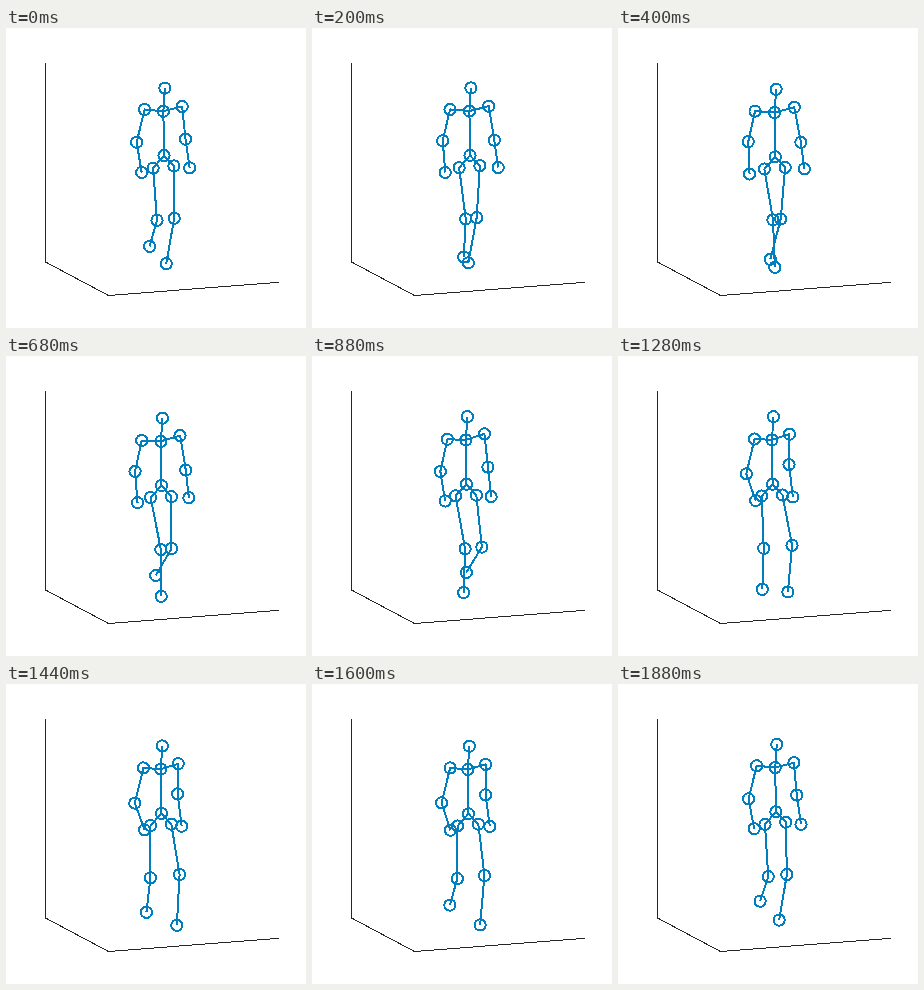
An HTML page for the animation above (1.92 s loop, 300x300 px).

```html
<!DOCTYPE html>
<html lang="en">
<head>
<meta charset="utf-8">
<title>Walking stick figure</title>
<style>
html, body { margin: 0; width: 100%; height: 100%; overflow: hidden; background: #fff; }
svg { display: block; }
</style>
</head>
<body>
<svg width="300" height="300" fill="none" shape-rendering="crispEdges">
  <path stroke="#262626" d="M39.5 35V234L102.5 267.5L273 254.3"/>
  <path id="walker" stroke="#007ebd" stroke-width="2" stroke-linejoin="round"/>
</svg>
<script>
const LOOP = 1920, STEP = 40, RADIUS = 5.6;
const { sin, cos, PI } = Math;
const walker = document.getElementById('walker');

// A step cycle: a main wave and its overtone, each with its own lag.
const cycle = (a, amp, lag, amp2, lag2) => amp * cos(a - lag) + amp2 * cos(2 * a - lag2);

// One side of the body; the two sides are half a cycle apart.
function limbs(a, side, sway, bob) {
  const p = side < 0 ? a : a + PI;
  const swing = sin(p + .25);
  const arm = [
    [155.5 + 18.5 * side + sway - 1.1 * swing, 80.9 - 2.1 * side + bob - .6 * cos(p)],
    [153.2 + 23.8 * side + sway + 2.3 * sin(a) - 2.5 * swing, 113.6 - 2.2 * side + bob - 2.5 * swing],
    [157.8 + 22.9 * side + sway - 4.5 * swing, 143.1 - 2.2 * side + bob + .4 * swing]
  ];
  const leg = [
    [155.6 + 10.4 * side + sway, 139.9 - .7 * side + bob + .4 * cos(p)],
    [159.8 + 9.2 * side - cos(a) + cycle(p, 5.4, 1.46, .8, 0),
      191.7 - side + cycle(p, .6, -PI / 2, 1.4, 4.36)],
    [153.9 + 6 * side - 1.3 * cos(a - .65) + cycle(p, 9.5, 1.82, 2, 2.06),
      230.9 + cycle(p, 10.8, 2.5, 4.4, 2.65)]
  ];
  return { arm, leg };
}

// Chains of joints, from the trunk outwards.
function pose(a) {
  const sway = 2 * cos(a - .35), bob = -1.3 * cos(2 * a - PI / 4);
  const head = [157 + sway, 61 + bob];
  const neck = [155.5 + sway, 84.2 + bob];
  const pelvis = [156.1 + sway, 128.5 + bob];
  const sides = [-1, 1].flatMap(side => {
    const { arm, leg } = limbs(a, side, sway, bob);
    return [[neck, ...arm], [pelvis, ...leg]];
  });
  return [[head, neck, pelvis], ...sides];
}

const line = chain => 'M' + chain.join('L');
const ring = ([x, y]) =>
  `M${x - RADIUS} ${y}a${RADIUS} ${RADIUS} 0 1 0 ${2 * RADIUS} 0a${RADIUS} ${RADIUS} 0 1 0 ${-2 * RADIUS} 0z`;

function draw() {
  const t = Math.floor(performance.now() % LOOP / STEP) * STEP;
  const chains = pose(2 * PI * t / LOOP);
  const joints = new Set(chains.flat());
  walker.setAttribute('d', chains.map(line).join('') + [...joints].map(ring).join(''));
  requestAnimationFrame(draw);
}
draw();
</script>
</body>
</html>
```
